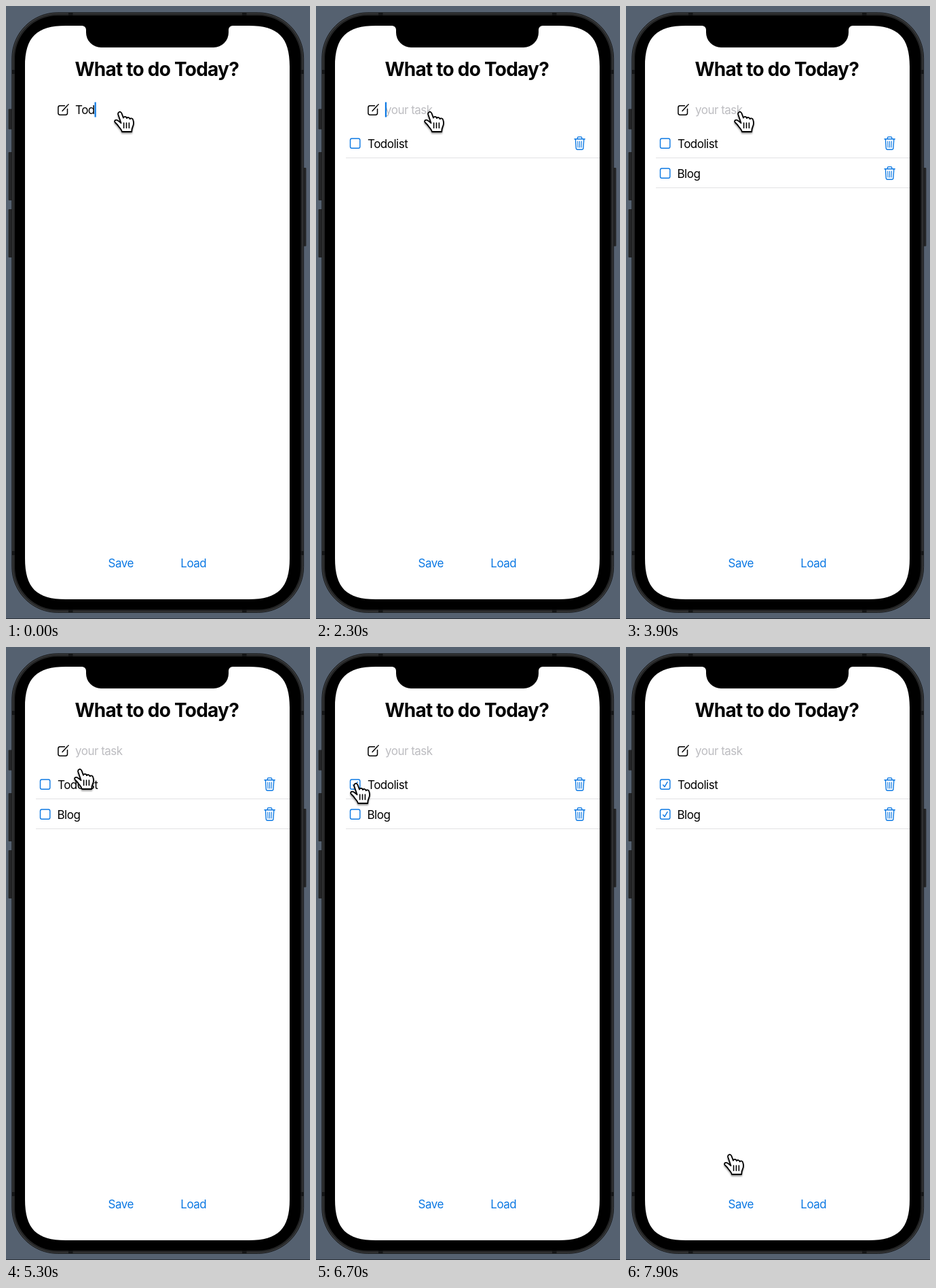
Recreate the animation shown at these times as an HTML page. Size 448 px wide and 902 px high, loop 8000 ms.

```html
<!DOCTYPE html>
<html lang="en">
<head>
<meta charset="utf-8">
<title>To-do list</title>
<style>
  html, body { margin: 0; width: 100%; height: 100%; overflow: hidden; background: #556170; }
  svg { display: block; width: 448px; height: 902px; }
  text { font: 17px Inter, "Liberation Sans", sans-serif; letter-spacing: -.5px; white-space: pre; }
  .title { font-size: 28px; font-weight: 700; letter-spacing: -.76px; text-anchor: middle; }
  .hint { fill: #bdbdc1; }
  .blue { fill: #0b78e3; }
  .line { fill: none; stroke: #0b78e3; stroke-width: 1.4; stroke-linecap: round; stroke-linejoin: round; }

  .row, .tick, #hand { animation: 8s infinite; }
  .row { animation-timing-function: steps(4, start); }
  .tick { animation-timing-function: step-end; }
  .one.row { animation-name: row-one; }
  .two.row { animation-name: row-two; }
  .one .tick { animation-name: tick-one; }
  .two .tick { animation-name: tick-two; }
  #hand { animation-name: point; animation-timing-function: step-end; filter: drop-shadow(0 2px 1px #0006); }

  @keyframes row-one { 0%, 8.75% { opacity: 0 } 13.75%, 100% { opacity: 1 } }
  @keyframes row-two { 0%, 43.75% { opacity: 0 } 48.75%, 100% { opacity: 1 } }
  @keyframes tick-one { 0% { opacity: 0 } 80%, 100% { opacity: 1 } }
  @keyframes tick-two { 0% { opacity: 0 } 88.75%, 100% { opacity: 1 } }
  @keyframes point {
    0% { transform: translate(159px, 154px) }
    66.25% { transform: translate(100px, 178px); animation-timing-function: steps(3) }
    70% { transform: translate(53px, 237px); animation-timing-function: steps(5) }
    76.25% { transform: translate(50px, 199px) }
    85% { transform: translate(50px, 199px); animation-timing-function: steps(3, start) }
    88.75% { transform: translate(50px, 242px) }
    91.25% { transform: translate(50px, 242px); animation-timing-function: steps(3, start) }
    95% { transform: translate(95px, 470px); animation-timing-function: steps(4, start) }
    100% { transform: translate(144px, 745px) }
  }
</style>
</head>
<body>
<svg viewBox="0 0 448 902">
  <defs>
    <rect id="box" class="line" x="50.5" y="195" width="14.3" height="14.3" rx="2.2"/>
    <path id="check" class="line" d="M54.6 203L57 205.700L61 198.700"/>
    <path id="rule" d="M44 223.5H418" stroke="#e2e2e4"/>
    <g id="bin" class="line">
      <path d="M381 195.8H396.2M385.4 195.5V194Q385.4 192.6 386.8 192.6H390.4Q391.8 192.6 391.8 194V195.5"/>
      <path d="M382.4 196L383.3 209.3Q383.5 211.3 385.4 211.3H391.8Q393.7 211.3 393.9 209.3L394.8 196"/>
      <path stroke-width="1.1" d="M385.8 199L386.1 208M388.6 199V208M391.4 199L391.1 208"/>
    </g>
  </defs>

  <rect width="448" height="902" fill="#556170"/>
  <path d="M0 901.5H448" stroke="#2c323a"/>

  <!-- phone -->
  <g fill="#242526">
    <rect x="3.6" y="151.500" width="7" height="30" rx="1"/>
    <rect x="3.6" y="215" width="7" height="71" rx="1"/>
    <rect x="3.6" y="299" width="7" height="71" rx="1"/>
    <rect x="436" y="238" width="6.4" height="115.500" rx="1"/>
  </g>
  <rect x="8.8" y="9.8" width="429.8" height="882.6" rx="67" fill="#3b3c3d" stroke="#17191b"/>
  <rect x="10.5" y="11.5" width="426.4" height="879.2" rx="65.5" fill="#242526"/>
  <path d="M92 12H98.5M348 12H354.5M92 890.2H98.5M348 890.2H354.5M11 94V100M11 802V808M436.5 94V100M436.5 802V808" stroke="#151617" stroke-width="4"/>
  <rect x="13" y="14" width="421.4" height="874.2" rx="63"/>
  <path fill="#fff" d="M28 89C28 46 45 29 88 29H112A6 6 0 0 1 118 35V39A22 22 0 0 0 140 61H306A22 22 0 0 0 328 39V35A6 6 0 0 1 334 29H358C401 29 418 46 418 89V813C418 856 401 873 358 873H88C45 873 28 856 28 813Z"/>

  <text class="title" x="222.3" y="103">What to do Today?</text>
  <path fill="none" stroke="#000" stroke-width="1.5" stroke-linecap="round" stroke-linejoin="round" d="M86.5 146.700H79.600Q76.900 146.700 76.900 149.400V157.600Q76.900 160.300 79.600 160.300H87.800Q90.500 160.300 90.500 157.600V151.500M83 154.400L90.600 146.200M91.600 145.200L92 144.800"/>
  <text class="hint" id="hint" x="102" y="159">your task</text>
  <text id="entry" x="102" y="159">Tod</text>
  <rect id="caret" class="blue" x="130" y="141.5" width="2.2" height="22"/>

  <g class="one row">
    <use href="#box"/><use href="#check" class="tick"/>
    <text x="76" y="208.500">Todolist</text>
    <use href="#bin"/><use href="#rule"/>
  </g>
  <g transform="translate(0 44)"><g class="two row">
    <use href="#box"/><use href="#check" class="tick"/>
    <text x="75.500" y="208.500">Blog</text>
    <use href="#bin"/><use href="#rule"/>
  </g></g>

  <text class="blue" x="150.500" y="825.500">Save</text>
  <text class="blue" x="257.300" y="825.500">Load</text>

  <g id="hand">
    <path fill="#fff" stroke="#000" stroke-width="1.8" stroke-linejoin="round" d="M10.6 18.2L6.4 6C5.2 2 9.8 0 11.4 3.8L14 10.6C14.8 8.2 18.4 8.4 19 11.2C19.9 9.3 23.2 9.7 23.7 12.3C24.8 10.7 27.7 11.2 28.3 13.7C29.5 17.5 29.4 20.5 27.6 24C26.6 26 26.2 28 26.2 31H12C11.5 27.8 8.5 25.5 6.5 22.5C5 20 3 18.8 1.6 17C0 14.6 3 12.6 5.6 14.4C7.6 15.6 9 16.8 10.6 18.2Z"/>
    <path stroke="#000" stroke-width="1.6" stroke-linecap="round" d="M14.6 18V25.5M18.5 18V25.5M22.4 18V25.5"/>
  </g>
</svg>
<script>
  const LOOP = 8000, LEFT = 101.8;
  const [hint, entry, caret] = ["hint", "entry", "caret"].map(id => document.getElementById(id));

  // [time, typed text]; null means the field has no focus
  const typing = [
    [0, "Tod"], [100, "Todo"], [300, "Todol"], [400, "Todoli"], [500, "Todolis"], [600, "Todolist"],
    [700, null], [2300, ""], [2800, "B"], [2900, "Bl"], [3000, "Blo"], [3200, "Blog"], [3500, null]
  ];
  let start, shown;

  function draw(now) {
    start ??= now;
    const time = (now - start) % LOOP;
    const text = typing.findLast(([at]) => at <= time)[1];
    if (text !== shown) {
      shown = text;
      entry.textContent = text ?? "";
      hint.style.display = text ? "none" : "";
      caret.style.display = text === null ? "none" : "";
      caret.setAttribute("x", LEFT + (text ? entry.getComputedTextLength() : 0));
    }
    requestAnimationFrame(draw);
  }
  requestAnimationFrame(draw);
</script>
</body>
</html>
```
